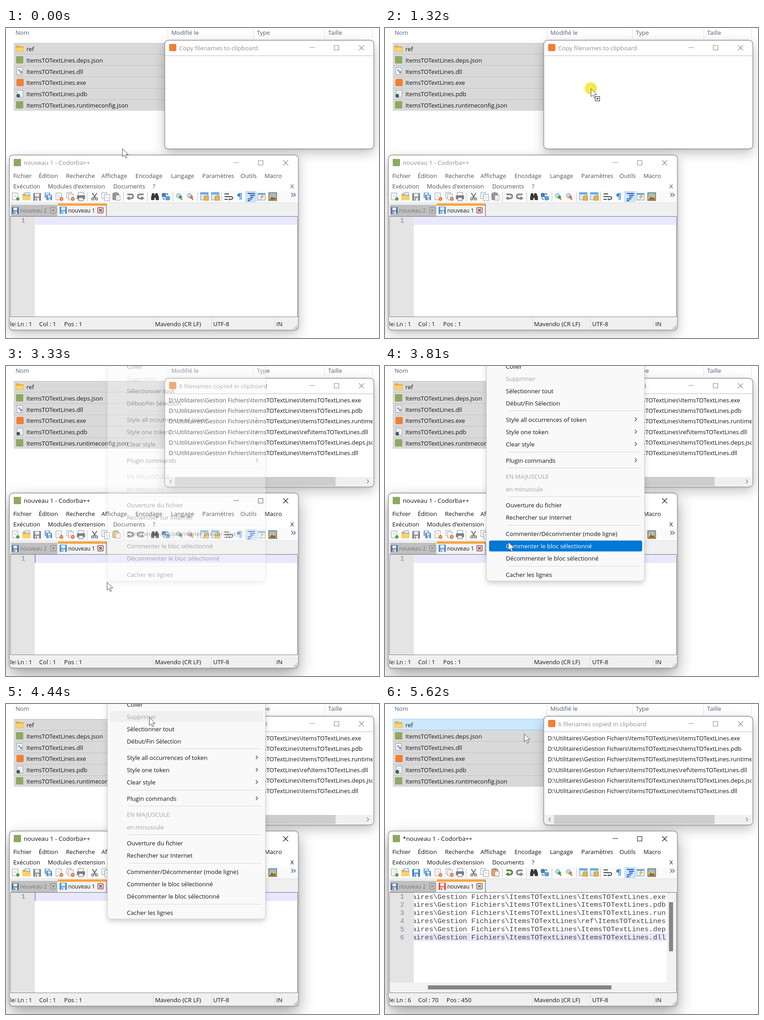
An HTML page for the animation above (5690 ms loop, 821 by 682 pixels).

```html
<!DOCTYPE html>
<html lang="fr">
<head>
<meta charset="utf-8">
<title>Copy filenames to clipboard</title>
<style>
html, body { margin: 0; width: 100%; height: 100%; overflow: hidden; background: #fff; }
svg { display: block; width: 821px; height: 682px; }
text { font: 13.1px "Open Sans", "Noto Sans", sans-serif; fill: #151515; white-space: pre; }
.head { fill: #4c607a; }
.list { font-size: 13px; }
.title { font-size: 13.4px; fill: #8f8f8f; }
.tab { font-size: 12px; }
.code { font: 15.5px "Liberation Mono", monospace; fill: #444; }
.num { font: 14.5px "Liberation Mono", monospace; fill: #7d8299; }
.bar { fill: #505050; }
.off { fill: #a2a2a2; }
.ctl { fill: none; stroke: #8a8a8a; stroke-width: 1.1; }
.on .title, .on .bar { fill: #111; }
.on .ctl { stroke: #111; }
.win { filter: drop-shadow(0 1px 3px rgba(0,0,0,.1)) drop-shadow(0 9px 13px rgba(0,0,0,.24)); }
.on .win { filter: drop-shadow(0 1px 3px rgba(0,0,0,.12)) drop-shadow(0 15px 18px rgba(0,0,0,.36)); }
.ifOn, .ifDirty { display: none; }
.on .ifOn, .dirty .ifDirty { display: inline; }
</style>
</head>
<body>
<svg id="stage" viewBox="0 0 821 682" width="821" height="682"></svg>
<script>
const APP = 'ItemsTOTextLines', EDITOR = 'Codorba++';
const DIR = 'D:\\Utilitaires\\Gestion Fichiers\\' + APP + '\\';
const PATHS = ['.exe', '.pdb', '.runtimeconfig.json', 'ref', '.deps.json', '.dll']
  .map(s => DIR + (s === 'ref' ? 'ref\\' + APP + '.dll' : APP + s));

// Drawing helpers
const rect = (x, y, w, h, fill, more = '') =>
  `<rect x="${x}" y="${y}" width="${w}" height="${h}" fill="${fill}" ${more}/>`;
const text = (x, y, s, cls = '', more = '') => `<text x="${x}" y="${y}" class="${cls}" ${more}>${s}</text>`;
const path = (d, stroke, fill = 'none', w = 1) =>
  `<path d="${d}" stroke="${stroke}" fill="${fill}" stroke-width="${w}"/>`;
const disc = (x, y, r, fill, more = '') => `<circle cx="${x}" cy="${y}" r="${r}" fill="${fill}" ${more}/>`;
const group = (body, more = '') => `<g ${more}>${body}</g>`;
const hline = (x1, x2, y, c) => rect(x1, y, x2 - x1, 1, c);
const vline = (x, y1, y2, c) => rect(x, y1, 1, y2 - y1, c);
const logoApp = (x, y) => rect(x, y, 16, 16, '#ef8035', 'rx="3"');
const logoEd = (x, y) => rect(x, y, 16, 16, '#8fa862', 'rx="1"');

const controls = (x, y) => `<path class="ctl" d="M${x} ${y}h12M${x + 54.5} ${y - 4.5}h10v10h-10z
  M${x + 109} ${y - 5}l11 11m0 -11l-11 11"/>`;
const frame = (x, y, w, h) => rect(x, y, w, h, '#fff', 'rx="8" class="win"')
  + rect(x, y, w, h, '#fff', 'rx="8" stroke="#949494" stroke-width="1.4"');

// Small icons
const sheet = (x, y, w = 12, h = 15) => rect(x, y, w, h, '#fff', 'stroke="#8b97a8"')
  + path(`M${x + 3} ${y + 5}h${w - 6}m${6 - w} 3h${w - 6}`, '#b4bdca');
const floppy = (x, y, c, s = 16) => rect(x, y, s, s, c, 'rx="1.5"')
  + rect(x + s * .22, y + 1, s * .56, s * .42, '#e4edf7') + rect(x + s * .25, y + s * .62, s * .5, s * .38, '#eef2f6')
  + rect(x + s * .35, y + s * .7, s * .14, s * .3, c);
const folder = (x, y) => path(`M${x} ${y}h6l2 2h8v11h-16z`, '#dca235', '#e9ae3f')
  + rect(x, y + 4, 16, 9, '#ffd262', 'rx="1"');
const clip = (x, y, c) => rect(x, y + 1, 13, 15, c, 'rx="1.5" stroke="#777"')
  + rect(x + 4, y - 1, 5, 4, '#999') + sheet(x + 7, y + 6, 9, 11);
const lens = (x, c) => path(`M${x + 9} 373l5 5`, '#a98555', 'none', 2.5) + disc(x + 6, 369, 5, '#c5def1', 'stroke="#6e91b8"')
  + disc(x + 10, 372, 3.5, c);
const lock = x => rect(x, 362, 17, 16, '#d9ebfa', 'stroke="#5c94cb"') + rect(x, 362, 17, 4, '#6aa7de')
  + rect(x + 8, 371, 10, 8, '#f0b63d', 'stroke="#b98225"') + path(`M${x + 10} 371v-3h6v3`, '#b98225');
const undo = c => path('M267 366h8q5 0 5 4.500t-5 4.500h-6'.replace(/00/g, ''), c, 'none', 3.4) + path('M272 370v9l-7 -4.5z', 'none', c);
const redo = c => group(undo(c), 'transform="matrix(-1 0 0 1 570 0)"');
const scissors = path('M190 363l7 11M200 363l-7 11', '#666', 'none', 2)
  + disc(191, 376, 2.5, 'none', 'stroke="#666" stroke-width="1.6"') + disc(199, 376, 2.5, 'none', 'stroke="#666" stroke-width="1.6"');
const cross = (x, c, bg) => rect(x, 395, 12, 12, bg, `rx="2" stroke="${c}" stroke-width="1.4"`)
  + path(`M${x + 3} 398l6 6m0 -6l-6 6`, c, 'none', 2);

function toolbar() {
  const blue = '#3d82c4', grey = '#868686';
  let s = [178, 258, 311, 367, 421, 474].map(x => vline(x, 361, 382, '#c3c3c3')).join('');
  s += sheet(14, 363) + disc(26, 376, 3.8, '#58a046');
  s += folder(37, 365) + rect(42, 362, 10, 6, '#dfecf8', 'stroke="#6b9cc8"');
  s += floppy(60, 363, grey, 17) + group(floppy(60, 363, blue, 17), 'class="ifDirty"');
  s += floppy(85, 362, '#6fa4d4', 12) + floppy(89, 367, blue, 12);
  s += sheet(110, 363) + disc(122, 376, 4, '#e36c2d') + rect(120, 375.3, 4, 1.4, '#fff');
  s += sheet(134, 362, 10, 12) + sheet(138, 365, 10, 13) + disc(147, 376, 4, '#e36c2d') + rect(145, 375.3, 4, 1.4, '#fff');
  s += rect(159, 362, 12, 7, '#fff', 'stroke="#888"') + rect(156, 368, 18, 9, '#77818e', 'rx="2"')
    + rect(160, 373, 10, 7, '#e8f1fb', 'stroke="#667"');
  s += scissors + sheet(211, 362, 10, 13) + sheet(217, 366, 11, 14);
  s += clip(235, 362, '#969696') + group(clip(235, 362, '#e9a94a'), 'class="ifOn"');
  s += undo(grey) + group(undo('#5f8a4b'), 'class="ifDirty"') + redo(grey);
  s += path('M322 364h4v4h3v-4h4l3 8v6h-6v-5h-4v5h-6v-6z', '#222', '#3a3a3a');
  s += rect(343, 363, 9, 9, '#3f7ec0', 'rx="2"') + rect(351, 370, 10, 9, '#5f9bd2', 'rx="2"')
    + path('M345 374l4 4m4 -14l4 3', '#1c4e88', 'none', 1.6);
  s += lens(374, '#4c9b45') + lens(398, '#e2793a') + lock(428) + lock(452);
  s += path('M481 365h10M481 371h14q4 0 4 3t-4 3h-4M481 377h7', '#444', 'none', 1.8) + path('M493 374l-4 3l4 3z', 'none', '#3a7bc4');
  s += path('M515 364v14m3 -14v14M519 364h-6', '#3f88d2', 'none', 1.6) + disc(512.5, 367.5, 3.5, '#3f88d2');
  s += rect(528, 360, 23, 22, '#cce8ff', 'stroke="#90c8f6"')
    + path('M532 364h16M537 368h11M537 372h8M532 376h10M532 380h6', '#2447a8', 'none', 2);
  s += rect(554.5, 363.5, 16, 15, '#f3f8fd', 'stroke="#5c94cb"') + rect(555, 363, 16, 4, '#6aa7de')
    + path('M565 366l-6 6h4l-3 6l8 -8h-4z', '#c98e1d', '#f6bf3c', .6);
  s += rect(578.5, 362.5, 17, 17, '#f0c46a', 'stroke="#666" stroke-width="1.6"') + rect(580, 364, 14, 6, '#8cc2e4')
    + path('M580 378l5 -8l4 4l3 -3l2 7z', 'none', '#8a6a35');
  return s + path('M628 363l4 4l-4 4m5 -8l4 4l-4 4', '#2c5d9e', 'none', 1.4);
}

function explorer() {
  const names = ['ref', ...['.deps.json', '.dll', '.exe', '.pdb', '.runtimeconfig.json'].map(e => APP + e)];
  let s = rect(1, 0, 355, 22, '#d9ebf9', 'id="headHover"');
  s += [356, 544, 701, 806].map(x => vline(x, 0, 24, '#e2e2e2')).join('');
  s += text(21, 15, 'Nom', 'head') + text(364, 15, 'Modifié le', 'head')
    + text(552, 15, 'Type', 'head') + text(709, 15, 'Taille', 'head');
  s += rect(17, 33, 500, 149, '#d9d9d9');
  for (let i = 0; i < 6; i++) s += hline(17, 517, Math.round(32.5 + i * 24.9), '#c2c2c2');
  s += rect(17.5, 33.5, 499, 24, '#cce8ff', 'id="fileHover" stroke="#99d1ff"');
  s += folder(22, 39) + logoEd(22, 62) + sheet(24, 87) + disc(29, 93, 2, '#888') + disc(33, 97, 2.5, '#888');
  s += logoApp(23, 112) + sheet(25, 137) + disc(27, 149, 4, '#2e6b55') + logoEd(22, 161);
  return s + names.map((n, i) => text(45, 50.7 + i * 24.9, n, 'list')).join('');
}

function clipWindow() {
  const rows = PATHS.map((p, i) => text(358, 79.8 + i * 23.3, p, 'list')).join('');
  const scroll = rect(352, 244, 455, 20, '#f0f0f0') + rect(372, 244, 353.5, 20, '#cdcdcd')
    + path('M364.5 250l-4 4l4 4M794.5 250l4 4l-4 4', '#777', 'none', 1.3);
  return frame(349.5, 27, 460, 239) + hline(351, 808, 60.5, '#b5b5b5') + logoApp(359, 35)
    + text(381, 48.7, '', 'title', 'id="clipTitle"') + controls(668, 43)
    + group(rect(352.5, 0, 454.5, 22.6, '#e5f3fb', 'id="rowHover" stroke="#70c0e7"') + rows + scroll,
      'id="rows" clip-path="url(#rowsClip)"');
}

function editor() {
  const bar = [[16, 'Fichier'], [72, 'Édition'], [132, 'Recherche'], [210, 'Affichage'], [285, 'Encodage'],
    [363, 'Langage'], [432, 'Paramètres'], [516, 'Outils'], [569, 'Macro']];
  const bar2 = [[16, 'Exécution'], [92, "Modules d'extension"], [236, 'Documents'], [323, '?'], [626, 'X']];
  let s = frame(7.5, 279.5, 636, 385) + logoEd(17, 288) + text(39, 301.3, '', 'title', 'id="edTitle"') + controls(501, 296);
  s += bar.map(b => text(b[0], 330.4, b[1], 'bar')).join('') + bar2.map(b => text(b[0], 353, b[1], 'bar')).join('');
  s += rect(9, 358, 633, 27, '#fafafa') + toolbar() + rect(9, 385, 633, 29, '#f0f0f0') + hline(9, 642, 384, '#dcdcdc');
  s += rect(11, 389, 102, 25, '#c0c0c0') + floppy(13, 394, '#4d6f9c', 15) + text(31, 406, 'nouveau 2', 'tab', 'style="fill:#777"')
    + cross(98, '#8b8b8b', '#d0d0d0');
  s += rect(114, 386, 107, 28, '#f2f2f2') + rect(114, 386, 107, 5, '#faa43a') + vline(220.5, 387, 414, '#555')
    + floppy(118, 393, '#4f92d0') + text(137, 406, 'nouveau 1', 'tab') + cross(202, '#8d4a4a', '#efe3e3')
    + group(floppy(118, 393, '#e2573c') + cross(202, '#7d6f6a', '#ece8e6'), 'class="ifDirty"');
  s += rect(10, 414.5, 631.5, 221, '#fff', 'stroke="#747474"') + rect(11, 415, 52.5, 220, '#e4e4e4');
  s += rect(63.5, 415, 576.5, 18, '#e8e8ff', 'id="line"') + rect(63.5, 415, 1.2, 18, '#5b4fe0', 'id="caret"');
  s += text(33.5, 428, '1', 'num');
  let doc = '', nums = '';
  PATHS.forEach((p, i) => {
    const y = 428.5 + i * 17.8;
    doc += text(-24, y, p, 'code');
    if (i) nums += text(33.5, y, i + 1, 'num');
  });
  s += group(nums + group(doc, 'clip-path="url(#docClip)"')
    + rect(620, 415, 20, 199, '#f2f2f2') + rect(11, 613, 629, 22, '#f2f2f2')
    + rect(625, 436, 9, 108, '#858585') + rect(94.5, 619, 404, 9, '#858585'), 'class="ifDirty"');
  s += rect(9, 637, 633, 26, '#f0f0f0', 'rx="5"') + [324, 452, 591].map(x => vline(x, 638, 663, '#d9d9d9')).join('');
  s += text(9, 656, 'lei', '', 'clip-path="url(#leiClip)"') + text(25, 656, '', '', 'id="ln"') + text(73, 656, '', '', 'id="col"')
    + text(128, 656, '', '', 'id="pos"') + text(328, 656, 'Mavendo (CR LF)') + text(456, 656, 'UTF-8') + text(595, 656, 'IN');
  for (let i = 0; i < 3; i++) for (let j = 0; j <= i; j++) s += rect(639 - j * 3, 654 + i * 3, 2, 2, '#a8a8a8');
  return group(s, 'id="ed"');
}

// Context menu entries: [centre y, label, kind], '-' disabled, '>' submenu
const ITEMS = [[1, 'Coller'], [28, 'Supprimer', '-'], [55, 'Sélectionner tout'], [82, 'Début/Fin Sélection'],
  [118, 'Style all occurrences of token', '>'], [145, 'Style one token', '>'], [172, 'Clear style', '>'],
  [208, 'Plugin commands', '>'], [243.5, 'EN MAJUSCULE', '-'], [271, 'en minuscule', '-'],
  [306, 'Ouverture du fichier'], [333.5, 'Rechercher sur Internet'], [369, 'Commenter/Décommenter (mode ligne)'],
  [396.5, 'Commenter le bloc sélectionné'], [423.5, 'Décommenter le bloc sélectionné'], [459, 'Cacher les lignes']];

function menu() {
  let s = rect(223.5, -14, 347.5, 487, '#f9f9f9', 'rx="8" stroke="#cfcfcf" style="filter:drop-shadow(0 5px 6px rgba(0,0,0,.18))"')
    + rect(229, 0, 337, 24, '#0078d4', 'rx="4" id="itemHover"');
  s += [98, 189, 224, 287, 350, 440].map(y => hline(270, 562, y, '#d8d8d8')).join('');
  s += ITEMS.map(([y, label, kind], i) => text(266, y + 4.7, label, kind === '-' ? 'off' : '', `id="item${i}"`)
    + (kind === '>' ? path(`M550 ${y - 4.5}l4 4l-4 4`, '#333', 'none', 1.1) : '')).join('');
  return group(s, 'id="menu"');
}

const ghost = group(rect(49.5, 3.5, 117, 117.5, '#ededed', 'rx="3" fill-opacity=".56" stroke="#bdbdbd" stroke-opacity=".8"')
  + rect(102, 53, 14, 19, '#0078d4') + text(105, 67.5, '6', '', 'style="fill:#fff;font-weight:700;font-size:12.5px"'), 'id="ghost"');
const pointer = group(disc(0, 0, 13.5, '#f3e51c', 'id="press" opacity=".8"')
  + path('M.5 .5V18L4.5 14.3L7.4 21L10.3 19.8L7.4 13.3H13.2Z', '#4a4a4a', '#fff')
  + group(rect(9.5, 17.5, 10, 10, '#fff', 'stroke="#222"') + path('M14.5 19.5v6m-3 -3h6', '#222'), 'id="plus"'), 'id="pointer"');

const box = (id, x, y, w, h) => `<clipPath id="${id}">${rect(x, y, w, h, '#000')}</clipPath>`;
const stage = document.getElementById('stage');
stage.innerHTML = `<defs>${box('rowsClip', 351, 62, 456, 203)}${box('docClip', 63.5, 415, 555.5, 198)}${box('leiClip', 9, 640, 12.5, 22)}</defs>`
  + rect(0, 0, 821, 682, '#fff') + explorer() + clipWindow() + editor() + ghost + menu() + pointer;

const $ = id => document.getElementById(id);
const show = (id, on) => { $(id).style.display = on ? 'inline' : 'none'; };
const set = (id, s) => { if ($(id).textContent !== s) $(id).textContent = s; };

// Pointer track: time, x, y, and whether the way there is eased
const TRACK = [[0, 256, 265], [560, 110, 108, 1], [760, 110, 108], [890, 110, 107], [1320, 453, 133, 1], [2380, 453, 133],
  [2870, 219, 463, 1], [3130, 219, 463], [3200, 221, 470], [3330, 222, 475], [3600, 222, 475], [3810, 271, 387],
  [4230, 320, 117], [4440, 315, 29], [4580, 311, 6], [5410, 311, 6], [5480, 310, 12], [5550, 308, 42], [5620, 306, 65]];
const LOOP = 5690, STEP = 70;
const STARTS = [0, 760, 890, 1320, 1650, 2380, 3200, 3330, 3670, 4800, 5480];

function tick(t) {
  const from = STARTS.filter(s => s <= t).pop();
  return from + Math.floor((t - from) / STEP) * STEP;
}

function place(t) {
  const i = TRACK.findIndex(k => k[0] > t);
  if (i < 0) return TRACK[TRACK.length - 1].slice(1, 3);
  const a = TRACK[Math.max(i - 1, 0)], b = TRACK[i];
  let u = Math.max(0, (t - a[0]) / (b[0] - a[0]));
  if (b[3]) u = u * u * (3 - 2 * u);
  return [a[1] + (b[1] - a[1]) * u, a[2] + (b[2] - a[2]) * u];
}

function draw(time) {
  const t = tick(time);
  const [x, y] = place(t), [px, py] = place(t - STEP);
  const dropped = t >= 1650, active = t >= 3200, pasted = t >= 4940;
  const dragging = t >= 890 && !dropped;

  $('pointer').setAttribute('transform', `translate(${x} ${y})`);
  show('press', t >= 760 && !dropped || t >= 3200 && t < 3330 || t >= 4580 && t < 4800);
  show('ghost', dragging && x < 349);
  show('plus', dragging && x >= 349);
  $('ghost').setAttribute('transform', `translate(${x - 110} ${y - 107})`);

  const free = t < 830 || t >= 5480;
  const file = Math.floor((py - 33) / 24.9);
  show('fileHover', free && px < 349 && file >= 0 && file < 6);
  $('fileHover').setAttribute('y', 33 + file * 24.9);
  show('headHover', t >= 5480 && py < 22);

  set('clipTitle', dropped ? '6 filenames copied in clipboard' : 'Copy filenames to clipboard');
  show('rows', dropped);
  const row = Math.floor((y - 63.3) / 23.3);
  show('rowHover', t >= 1720 && t < 3200 && x > 352 && row >= 0 && row < 6);
  $('rowHover').setAttribute('y', 63.3 + row * 23.3);

  $('ed').classList.toggle('on', active);
  $('ed').classList.toggle('dirty', pasted);
  set('edTitle', (pasted ? '*' : '') + 'nouveau 1 - ' + EDITOR);
  set('ln', pasted ? 'Ln : 6' : 'Ln : 1');
  set('col', pasted ? 'Col : 70' : 'Col : 1');
  set('pos', pasted ? 'Pos : 450' : 'Pos : 1');
  $('pos').setAttribute('x', pasted ? 135.5 : 128);
  $('line').setAttribute('y', pasted ? 504 : 415);
  show('caret', active && !pasted && Math.floor((t - 3200) / 540) % 2 === 0);

  const fadeIn = .35 + (t - 3330) / 140 * .65, fadeOut = 1 - (t - 4730) / 280;
  const alpha = t < 3330 ? 0 : Math.max(0, Math.min(1, fadeIn, fadeOut));
  show('menu', alpha > 0);
  $('menu').setAttribute('opacity', alpha);
  const hot = x > 224 && t >= 3670 ? ITEMS.findIndex(m => Math.abs(m[0] - y) < 13.6) : -1;
  show('itemHover', hot >= 0);
  ITEMS.forEach((m, i) => { $('item' + i).style.fill = i === hot && m[2] !== '-' ? '#fff' : ''; });
  if (hot >= 0) {
    $('itemHover').setAttribute('y', ITEMS[hot][0] - 12.5);
    $('itemHover').setAttribute('fill', ITEMS[hot][2] === '-' ? '#f0f0f0' : '#0078d4');
  }
}

const begin = performance.now();
function loop() {
  draw((performance.now() - begin) % LOOP);
  requestAnimationFrame(loop);
}
loop();
</script>
</body>
</html>
```
